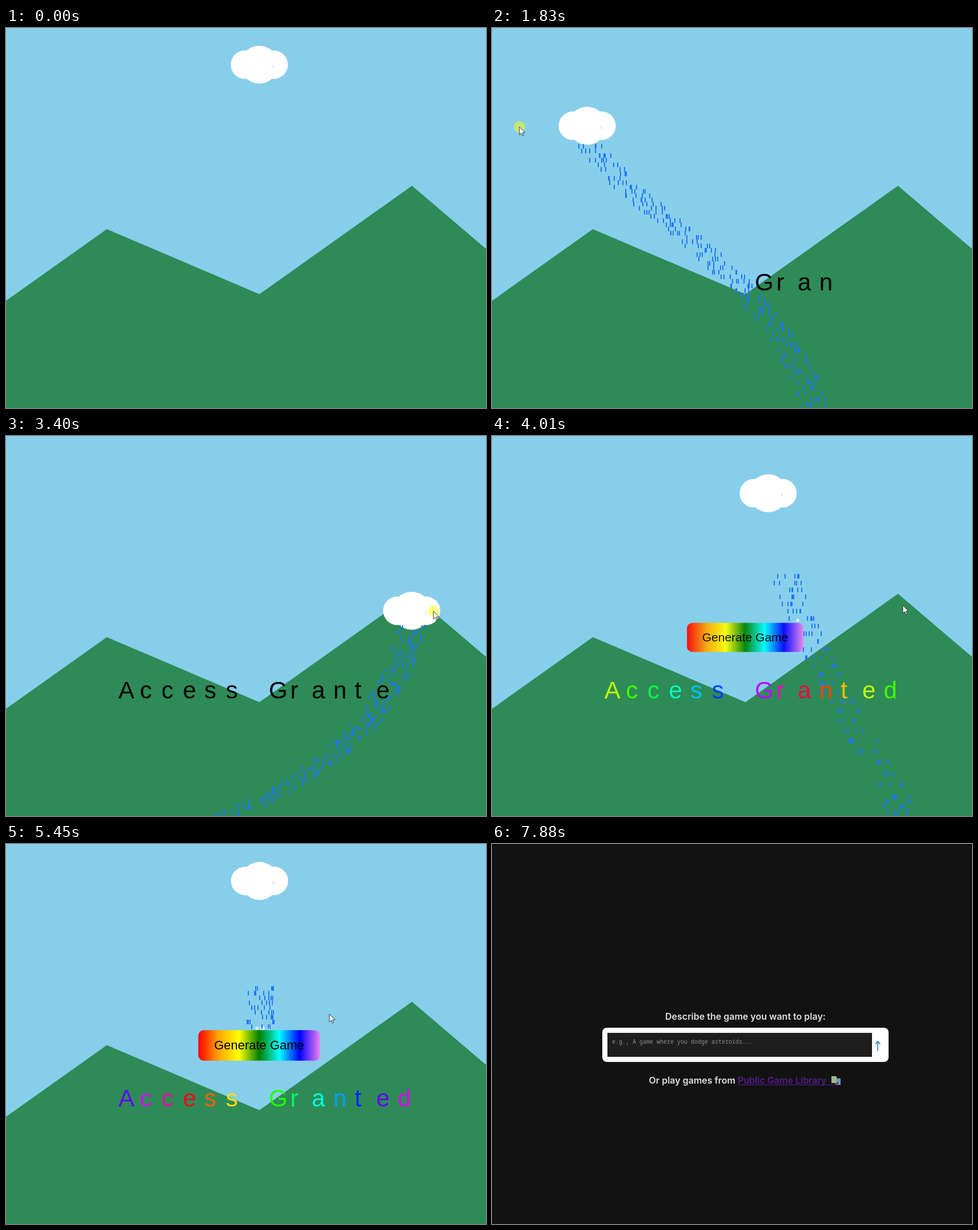
An HTML page with a canvas for the animation above (8.59 s loop, 840 px wide and 666 px high).

```html
<!DOCTYPE html>
<html lang="en">
<head>
<meta charset="utf-8">
<title>Rain cloud</title>
<style>
  html, body { margin: 0; width: 100%; height: 100%; overflow: hidden; background: #87ceeb; }
  canvas { display: block; }
</style>
</head>
<body>
<canvas id="stage" width="840" height="666"></canvas>
<script>
const ctx = document.getElementById('stage').getContext('2d');
const LOOP = 8.59, FREEZE = 6.66, CURSOR_GONE = 7.04, FADE = [7.2, 7.88];
const HOME = { x: 443.3, y: 64.3 }, UNLOCK = 3.42;
const RATE = 60, CHASE = 0.052, FALL = 500, DROPS = 5, DROP_H = 8;
const BUTTON = { x: 443, y: 353, w: 203.5, h: 51, from: 3.5 };
const MESSAGE = [...'Access Granted'];
const SANS = '"Liberation Sans", Arial, sans-serif';

// Where the hand goes: seconds, x, y
const CURSOR = [
  [0.45, 796, 680], [0.5, 733, 371], [0.7, 610, 140], [1.1, 405, 135], [1.6, 105, 185],
  [1.83, 48, 173], [2.1, 36, 250], [2.41, 80, 275], [2.54, 695, 308], [2.72, 700, 312],
  [3, 754, 312], [3.4, 748, 307], [3.82, 719, 297], [4.85, 719, 297], [5.13, 566, 298],
  [6.28, 566, 298], [6.43, 489, 343]
];
const ENTER = CURSOR[0][0];

const clamp = (v, lo = 0, hi = 1) => Math.min(hi, Math.max(lo, v));
const mix = (a, b, u) => a + (b - a) * u;
const noise = (a, b) => {
  const s = Math.sin(a * 12.9898 + b * 78.233) * 43758.5453;
  return s - Math.floor(s);
};

function cursorAt(t) {
  const next = CURSOR.findIndex(key => key[0] > t);
  if (next < 0) return { x: CURSOR.at(-1)[1], y: CURSOR.at(-1)[2] };
  const [t1, x1, y1] = CURSOR[next], [t0, x0, y0] = CURSOR[Math.max(0, next - 1)];
  const u = next ? (t - t0) / (t1 - t0) : 0;
  return { x: mix(x0, x1, u), y: mix(y0, y1, u) };
}

// The cloud chases the cursor until the message is complete, then drifts home
const track = [HOME];
for (let n = 1; n <= FREEZE * RATE + 1; n++) {
  const t = n / RATE, { x, y } = track[n - 1];
  const goal = t < ENTER || t > UNLOCK ? HOME : cursorAt(t);
  track.push({ x: mix(x, goal.x, CHASE), y: mix(y, goal.y, CHASE) });
}

function cloudAt(t) {
  const n = Math.floor(t * RATE), a = track[n], b = track[n + 1], u = t * RATE - n;
  return { x: mix(a.x, b.x, u), y: mix(a.y, b.y, u) };
}

// It rains while the cursor moves
const drops = [];
track.forEach((cloud, n) => {
  const born = n / RATE, now = cursorAt(born), before = cursorAt(born - 1 / RATE);
  if (now.x === before.x && now.y === before.y) return;
  for (let k = 1; k <= DROPS; k++) {
    const x = Math.round(cloud.x - 25 + 50 * noise(n, k)), y = cloud.y + 25;
    const hit = born + (BUTTON.y - 27 - DROP_H - y) / FALL;
    const blocked = hit > BUTTON.from && Math.abs(x - BUTTON.x) < BUTTON.w / 2;
    drops.push({ x, y, born, end: blocked ? hit : Infinity, splash: noise(k, n) < 0.12 });
  }
});

// Each letter appears when the first drop touches it
const letters = MESSAGE.map((glyph, i) => {
  const x = 196.7 + 37.6 * i;
  const touching = drops.filter(d => Math.abs(d.x - x - 12) < 7);
  return { glyph, x, from: Math.min(UNLOCK, ...touching.map(d => d.born + (437 - d.y) / FALL)) };
});

function polygon(points, fill) {
  ctx.beginPath();
  points.forEach(([x, y]) => ctx.lineTo(x, y));
  ctx.closePath();
  ctx.fillStyle = fill;
  ctx.fill();
}

function disc(x, y, r, fill) {
  ctx.beginPath();
  ctx.arc(x, y, r, 0, 7);
  ctx.fillStyle = fill;
  ctx.fill();
}

function roundBox(x, y, w, h, r, fill) {
  ctx.beginPath();
  ctx.roundRect(x, y, w, h, r);
  ctx.fillStyle = fill;
  ctx.fill();
}

function box(x, y, w, h, fill) {
  ctx.fillStyle = fill;
  ctx.fillRect(x, y, w, h);
}

function text(str, x, y, font, fill, align = 'left') {
  ctx.font = font;
  ctx.fillStyle = fill;
  ctx.textAlign = align;
  ctx.fillText(str, x, y);
}

function drawLand() {
  box(0, 0, 840, 666, '#87ceeb');
  polygon([[-90.5, 542.5], [176.5, 352.5], [443.5, 466.5], [710.5, 276.5], [933, 466.5],
    [933, 666], [-90.5, 666]], '#2e8b57');
}

function drawCloud(t) {
  const { x, y } = cloudAt(t);
  disc(x - 25, y, 25, '#fff');
  disc(x, y, 33.3, '#fff');
  disc(x + 25, y, 25, '#fff');
  box(x + 24, y, 1, 6, '#a9d8ee');
}

function drawRain(t) {
  for (const { x, y, born, end, splash } of drops) {
    if (t < born) break;
    if (t < end) box(x - 1, y + FALL * (t - born), 2, DROP_H, '#1f77fa');
    else if (splash && t < end + 0.08) disc(x, BUTTON.y - 30, 3, 'rgba(255,255,255,.6)');
  }
}

function drawMessage(t) {
  const hue = 75 + 130 * (t - 4.01);
  letters.forEach(({ glyph, x, from }, i) => {
    if (t < from) return;
    const fill = t < UNLOCK ? '#000' : `hsl(${hue + 30 * i}, 100%, 50%)`;
    text(glyph, x, 459.6, `42px ${SANS}`, fill);
  });
}

function drawButton(t) {
  const alpha = clamp((t - BUTTON.from) / 0.55);
  if (!alpha) return;
  const { x, y, w, h } = BUTTON;
  const pulse = 1 + 0.025 * (1 - Math.cos(2 * Math.PI * (t - 3.98) / 2.5));
  const rainbow = ctx.createLinearGradient(-w / 2, 0, w / 2, 0);
  ['red', 'orange', 'yellow', 'green', 'cyan', 'blue', 'violet']
    .forEach((c, i) => rainbow.addColorStop(i / 6, c));
  ctx.save();
  ctx.globalAlpha = alpha;
  ctx.translate(x, y);
  ctx.scale(pulse, pulse);
  roundBox(-w / 2, -h / 2, w, h, 9, rainbow);
  text('Generate Game', 0, 7, `21px ${SANS}`, '#000', 'center');
  ctx.restore();
}

function drawCursor(t) {
  if (t < ENTER || t >= CURSOR_GONE) return;
  const { x, y } = cursorAt(t);
  if (t < UNLOCK) disc(x, y, 10, 'rgba(255,255,0,.5)');
  polygon([[0, 0], [0, 14], [3.2, 11], [5.6, 16], [7.6, 15], [5.3, 10.2], [9.8, 10]]
    .map(([a, b]) => [x + a, y + b]), '#fff');
  ctx.strokeStyle = '#222';
  ctx.lineWidth = 0.9;
  ctx.stroke();
}

function drawPage() {
  const bold = '600 16px Inter, sans-serif', lead = 'Or play games from ';
  box(0, 0, 840, 666, '#121212');
  text('Describe the game you want to play:', 443.5, 308, bold, '#e0e0e0', 'center');
  roundBox(193, 322, 501, 60, 8, '#fff');
  box(202, 331, 463, 42, '#1e1e1e');
  text('e.g., A game where you dodge asteroids...', 210, 350, '10px "Noto Sans Mono", monospace', '#8c8c8c');

  ctx.beginPath();
  ctx.moveTo(675, 363);
  ctx.lineTo(675, 346);
  ctx.moveTo(671, 351);
  ctx.lineTo(675, 346);
  ctx.lineTo(679, 351);
  ctx.strokeStyle = '#1a7fb5';
  ctx.lineWidth = 1.5;
  ctx.stroke();

  text(lead, 274.5, 420, bold, '#e0e0e0');
  const linkX = 274.5 + ctx.measureText(lead).width;
  text('Public Game Library', linkX, 420, bold, '#551a8b');
  box(linkX, 421.5, 610 - linkX, 1.2, '#551a8b');
  box(601, 410, 5, 10, '#8e3048');
  box(602, 411, 8, 11, '#5d9ed0');
  box(600, 417, 6, 4, '#8e3048');
  box(594, 407, 9, 12, '#9dbb88');
}

function frame(now) {
  const t = now / 1000 % LOOP, live = Math.min(t, FREEZE);
  const fade = clamp((t - FADE[0]) / (FADE[1] - FADE[0]));
  ctx.globalAlpha = 1;
  if (fade < 1) {
    drawLand();
    drawCloud(live);
    drawRain(live);
    drawMessage(live);
    drawButton(live);
    drawCursor(t);
  }
  if (fade > 0) {
    ctx.globalAlpha = fade;
    drawPage();
  }
  requestAnimationFrame(() => frame(performance.now()));
}
frame(0);
</script>
</body>
</html>
```
